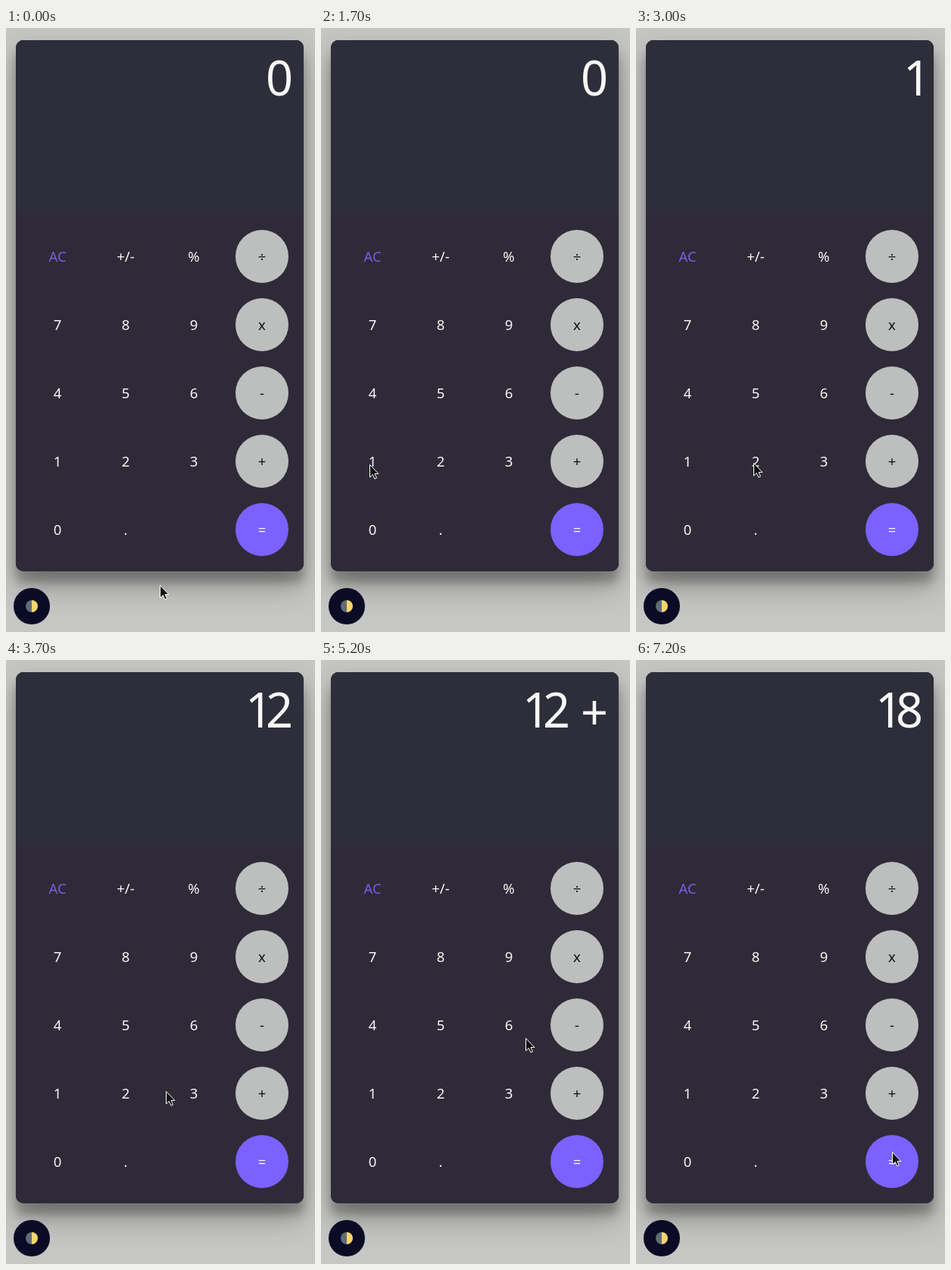
Write an HTML page with a canvas that moves like this. It is 408 px wide and 796 px high and loops after 8 s.

```html
<!DOCTYPE html>
<html lang="en">
<head>
<meta charset="utf-8">
<title>Calculator</title>
<style>
  html, body { margin: 0; width: 100%; height: 100%; overflow: hidden; background: #c6c6c4; }
  canvas { display: block; }
</style>
</head>
<body>
<canvas id="stage" width="408" height="796"></canvas>
<script>
const ctx = document.getElementById('stage').getContext('2d');
const FONT = '"Noto Sans", "Open Sans", sans-serif';
const INK = '#f8f8f8', DARK = '#111';
const LOOP = 8000, STEP = 100;
const KEYS = ['AC +/- % ÷', '7 8 9 x', '4 5 6 -', '1 2 3 +', '0 .  ='].map(row => row.split(' '));
const START = { x: 203, y: 734 };
// Each move starts where the last one ended; sag bends its path downwards.
const MOVES = [
  { from: 200, until: 1100, x: 85, y: 710, sag: 33 },
  { from: 1100, until: 1700, x: 64, y: 575 },
  { from: 2000, until: 3000, x: 155, y: 573, sag: 5 },
  { from: 3400, until: 4300, x: 323, y: 559 },
  { from: 4600, until: 5200, x: 270, y: 498 },
  { from: 6200, until: 6800, x: 344, y: 676, ease: 1.5 },
  { from: 6800, until: 6900, x: 338, y: 648 }
];
const PRESSES = [
  { at: 2100, text: '1' }, { at: 3500, text: '2' }, { at: 4700, text: ' +' },
  { at: 5400, text: ' 6' }, { at: 7200, text: '=' }
];

function disc(x, y, r, color, from = 0, to = Math.PI * 2) {
  ctx.fillStyle = color;
  ctx.beginPath();
  ctx.arc(x, y, r, from, to);
  ctx.fill();
}

function panel(height, color, radii, shadowY = 0, blur = 0, alpha = 0) {
  ctx.save();
  ctx.shadowColor = `rgba(0,0,0,${alpha})`;
  ctx.shadowBlur = blur;
  ctx.shadowOffsetY = shadowY;
  ctx.fillStyle = color;
  ctx.beginPath();
  ctx.roundRect(13, 16, 380, height, radii);
  ctx.fill();
  ctx.restore();
}

function drawBody() {
  ctx.fillStyle = '#c6c6c4';
  ctx.fillRect(0, 0, 408, 796);
  panel(700, '#2f2a37', 10, 19, 38, 0.3);
  panel(700, '#2f2a37', 10, 15, 12, 0.22);
  panel(230, '#2e2d3a', [10, 10, 0, 0]);
}

function drawKeys() {
  ctx.font = `18.5px ${FONT}`;
  ctx.textAlign = 'center';
  KEYS.forEach((row, r) => row.forEach((label, c) => {
    const x = 68 + 90 * c, y = 301 + 90 * r;
    const equals = label === '=', operator = c === 3 && !equals;
    if (c === 3) disc(x, y, 35, equals ? '#7b61ff' : '#bdbfbe');
    ctx.fillStyle = label === 'AC' ? '#7460e6' : operator ? DARK : INK;
    ctx.fillText(label, x, y + 7);
  }));
}

function drawToggle() {
  const quarter = Math.PI / 2;
  disc(34, 762, 24, '#0c0b25');
  disc(34, 762, 8, '#5f6d7a', quarter, 3 * quarter);
  disc(34, 762, 8, '#fbd56c', -quarter, quarter);
}

function readoutAt(t) {
  const typed = PRESSES.filter(p => p.at <= t).map(p => p.text).join('');
  if (!typed.endsWith('=')) return typed || '0';
  const [a, b] = typed.slice(0, -1).split('+').map(Number);
  return String(a + b);
}

// Sets the readout from the right with even gaps between the inked shapes.
function drawReadout(text) {
  ctx.font = `63px ${FONT}`;
  ctx.textAlign = 'left';
  ctx.fillStyle = INK;
  let right = 376;
  for (const ch of [...text].reverse()) {
    if (ch === ' ') { right -= 13; continue; }
    const m = ctx.measureText(ch);
    ctx.fillText(ch, right - m.actualBoundingBoxRight, ch === '+' ? 92 : 89);
    right -= m.actualBoundingBoxRight + m.actualBoundingBoxLeft + 7;
  }
}

function pointerAt(t) {
  let { x, y } = START;
  for (const { from, until, x: toX, y: toY, sag = 0, ease = 1 } of MOVES) {
    if (t <= from) break;
    const k = Math.min(1, (t - from) / (until - from)) ** ease;
    x += (toX - x) * k;
    y += (toY - y) * k + 4 * sag * k * (1 - k);
  }
  return [Math.round(x), Math.round(y)];
}

function drawPointer([x, y]) {
  ctx.save();
  ctx.translate(x + 0.5, y + 0.5);
  const arrow = new Path2D('M0 0V16.5L3.8 13L6.4 18.7L9 17.5L6.5 12H11.4Z');
  ctx.fillStyle = DARK;
  ctx.strokeStyle = '#fff';
  ctx.lineWidth = 1;
  ctx.fill(arrow);
  ctx.stroke(arrow);
  ctx.restore();
}

function frame(now) {
  const t = Math.floor((now % LOOP) / STEP) * STEP;
  drawBody();
  drawKeys();
  drawToggle();
  drawReadout(readoutAt(t));
  drawPointer(pointerAt(t));
  requestAnimationFrame(frame);
}
requestAnimationFrame(frame);
</script>
</body>
</html>
```
